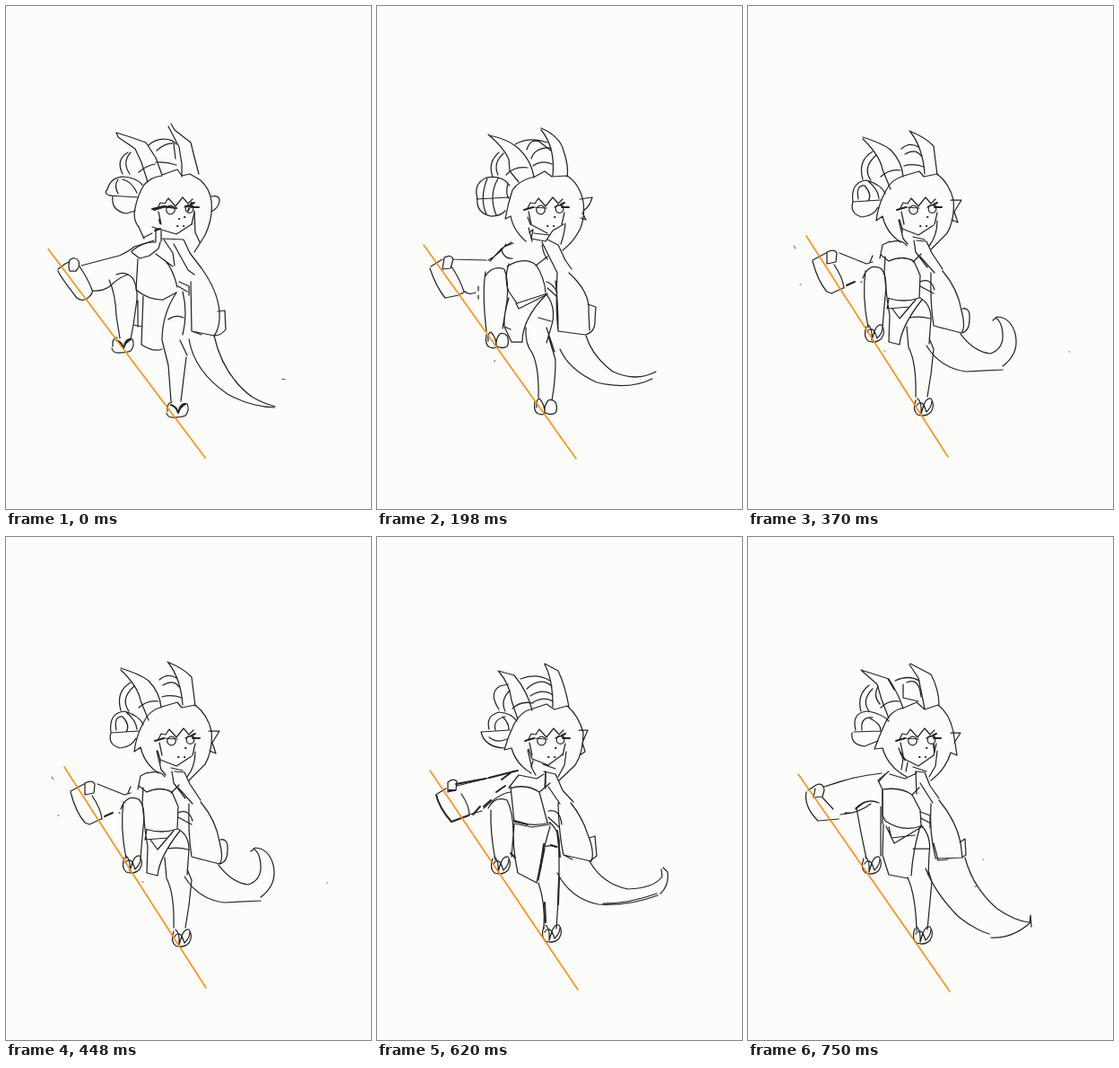
An HTML page for the animation above (0.87 s loop, 407 by 560 pixels).

```html
<!DOCTYPE html>
<html lang="en">
<head>
<meta charset="utf-8">
<title>Balancing on a pole</title>
<style>
html, body { margin: 0; width: 100%; height: 100%; overflow: hidden; background: #fcfcfa; }
svg { display: block; width: 407px; height: 560px; }
path, circle { fill: none; stroke: #252525; stroke-width: 1.25; stroke-linecap: round; stroke-linejoin: round; }
.bold { stroke-width: 2; }
.pole { stroke: #ff8c0a; stroke-width: 1.5; }
.pose { visibility: hidden; animation: short 870ms step-end infinite; animation-delay: calc(var(--at) * 1ms - 870ms); }
.long { animation-name: long; }
@keyframes short { 0% { visibility: visible; } 13.7931%, 100% { visibility: hidden; } }
@keyframes long { 0% { visibility: visible; } 14.9425%, 100% { visibility: hidden; } }
</style>
</head>
<body>
<svg viewBox="0 0 407 560">
<defs>
  <g id="face">
    <path d="M169 225L172 219 177 220 181 214 189 223 197 213 203 220 208 215"/>
    <path class="bold" d="M165 227L175 224M207 224L215 224M206 221L210 219"/>
    <path d="M175 224L190 225M199 224Q204 220 209 223M170 229L173 243M210 230L207 243"/>
    <circle cx="183.500" cy="227" r="4.800"/><circle cx="204.500" cy="226" r="4.300"/>
    <path class="bold" d="M191 245h.5M199 235h.5M198 245h.3"/>
  </g>
  <path id="wide" d="M-12-6Q-14 6-8 8Q-2 10 0 7Q6 10 11 7Q14 2 11-5Q7-9 3-7Q-2-1-1 7Q-1-3-7-9Q-11-8-10 1"/>
  <path id="round" d="M-9-7Q-13 4-7 9Q2 12 8 6Q13-2 8-9Q3-10 0-2L-3 8Q-2-5-7-9M-8-1Q-5-7 0-2L3 6Q9 0 9-6"/>
  <g id="strap">
    <path d="M-11 2Q-12-7-6-8M-12 4Q-11 9-5 9Q5 9 9 7Q14 1 11-6Q5-8 2-1"/>
    <path class="bold" d="M-7-5Q-1-3 1 4Q3-3 9-6"/>
  </g>
</defs>

<g class="pose" style="--at:0">
  <path d="M123 141L139 146 156 152 167 169 174 188M123 141L125 146 144 159 151 174 158 196M184 131L188 138 206 152 210 168 215 187M181 134L193 157 196 176 196 190"/>
  <path d="M130 187Q122 171 136 163M138 187Q129 174 139 163M159 155Q166 148 176 148Q186 148 190 154M168 161Q178 152 187 153L189 170M167 174Q178 173 190 177M148 185Q156 178 166 176"/>
  <path d="M118 211Q108 210 113 204Q117 190 131 190Q145 191 152 199M115 211L147 213M125 193Q120 200 125 209M119 212Q117 228 134 231L144 228M130 193Q140 195 146 208"/>
  <path d="M174 189Q162 190 154 199Q147 210 144 225Q141 238 148 246L154 259M174 188L191 182 196 189 205 187 217 194Q227 203 229 217Q231 236 222 255L210 274M229 212Q238 210 238 217Q237 225 229 229M153 258L163 253M210 228L211 252 216 263"/>
  <use href="#face"/>
  <path class="bold" d="M163 226L176 223 190 225M200 223L212 224M207 219L203 228M171 238L172 242M193 237h.3M166 250L172 248"/>
  <path d="M163 246L190 254 207 243M167 248V262M173 250V262"/>
  <path d="M84 289L126 278Q134 275 143 268L165 261M58 293L66 287 70 285M58 295Q61 302 79 325Q84 329 90 326Q98 320 96 316Q91 303 82 290M71 283Q77 278 81 284Q83 290 78 295L71 295Q69 289 71 283M96 317Q109 318 117 311Q126 302 136 299"/>
  <path d="M140 273Q153 262 167 263M140 274L149 281 160 278 170 270 172 263M167 276L186 290M147 282L145 316Q158 327 175 327L190 319M177 283Q186 292 191 313"/>
  <path d="M115 305Q122 320 123 345L127 370M123 299Q134 294 142 304Q147 315 146 327L142 355 139 371M153 323L151 377Q165 386 174 382M147 328V357M142 355L152 357M190 319Q174 343 174 372L181 400 184 440M197 318Q203 342 197 366M201 391L198 415 195 440M181 349Q189 343 198 347M193 307L204 312 204 322M192 312L202 318M194 372L202 389"/>
  <path d="M174 259L198 260 205 275 218 292Q236 317 238 340Q239 359 232 367L207 362 206 307M187 265L203 294 210 299M176 260L186 275 188 289M236 340L244 339 245 360Q240 367 232 367M207 362L218 366"/>
  <path d="M204 371Q210 407 247 432Q272 446 299 447M232 367Q242 411 274 435Q286 442 300 446"/>
  <path style="stroke-width:.8" d="M308 415.500h3"/>
  <use href="#strap" x="130" y="377"/><use href="#strap" x="191" y="449"/>
  <path class="pole" d="M47 270.500L222.500 503.500"/>
</g>

<g class="pose long" style="--at:120">
  <path d="M125 144Q145 148 156 157Q172 171 175 191M124 143Q142 158 147 171L148 184M149 185L158 196M183 136Q204 145 208 161Q214 178 212 190M183 138Q199 157 196 189"/>
  <path d="M129 190Q123 174 136 163M135 188Q129 175 141 164M154 154Q170 145 190 152M167 160Q171 147 181 151L194 161M172 170Q176 157 194 158M174 178Q184 171 195 176M144 188Q153 178 168 180"/>
  <path d="M112 214Q107 198 122 191Q140 188 148 200M112 214Q110 230 127 234Q138 234 143 228M111 215L147 213M123 192Q114 214 122 232M135 192Q124 211 133 233M146 197Q143 210 147 214"/>
  <path d="M176 190Q158 194 151 205Q146 220 143 237L149 234Q152 250 166 262M176 190L187 184 195 190 212 189Q226 198 230 218Q232 234 227 247Q220 262 207 272M226 215L240 213Q237 224 230 228M229 230L233 238 227 236M169 247L173 262M210 242Q209 254 205 265"/>
  <use href="#face" x="-1"/>
  <path d="M168 235L171 243 190 253M170 252L174 249 172 259 188 262 196 250 208 243M175 253L192 255"/>
  <path d="M84 282L122 283M126 284L139 270 150 263M139 272Q142 282 151 281M142 268L152 264M60 290L73 282M59 292Q66 313 76 325L91 322 98 318M83 290Q92 303 97 318M98 318Q102 322 110 319M75 280Q83 276 85 282L82 292 73 293 75 280M113 312v5M113 322v4M124 283Q137 276 144 265"/>
  <path d="M147 287Q141 304 147 318L156 331 190 320M145 290Q165 278 178 289Q187 304 188 319M177 289L190 279M155 331L158 337 190 321M184 266Q186 278 190 282"/>
  <path d="M121 296Q117 319 122 362M120 302Q128 288 142 293Q147 305 145 328L140 359M147 325Q141 344 142 357L150 374H162Q162 348 189 321M142 357L149 360M189 321Q201 337 194 358L189 375M180 347L194 351M166 358Q165 377 173 386Q181 403 180 436M191 367L199 394Q199 418 195 439M189 358L198 385M189 307Q196 309 201 319M190 314L200 323"/>
  <path d="M184 263L201 297Q199 337 202 362L232 366Q244 363 243 349L244 335 235 332M190 260L202 266 210 283 217 293M214 297Q238 319 236 340L237 361M202 362Q202 330 199 306"/>
  <path d="M204 382Q214 405 245 419Q281 428 307 415M233 367Q240 390 263 407Q289 419 311 407M131 395h.5"/>
  <use href="#wide" x="134" y="372"/><use href="#wide" x="188" y="446"/>
  <path class="pole" d="M52 266L222 504"/>
</g>

<g class="pose" style="--at:250">
  <path d="M128 147Q150 154 160 160Q172 175 174 191M128 147Q147 169 149 184L160 207M184 138Q200 150 206 155M184 140Q197 157 196 190M207 156L211 190"/>
  <path d="M126 193Q122 170 141 162M132 194Q128 177 144 167M157 157Q180 147 198 161M166 162Q178 152 187 159Q195 164 193 178M174 178Q179 160 188 158M170 180Q183 176 194 180M151 191Q160 181 171 183"/>
  <path d="M113 216Q113 197 130 192M122 215Q121 201 138 195L150 198M140 196Q150 203 153 211M113 217L148 216M113 218Q114 231 127 233L143 231"/>
  <path d="M174 190Q160 193 155 204Q147 217 143 236L151 234 158 249 172 263M174 191L191 185 196 190 211 190Q226 200 230 220Q231 239 223 252L206 270M224 216L240 215 230 229M231 229L234 240 226 243M166 228Q166 251 172 263M214 234L210 253 204 266"/>
  <use href="#face" x=".5" y="-1"/>
  <path class="bold" d="M168 237L169 243M173 240L173 244M190 243L194 243"/>
  <path d="M168 242L190 252 208 242M171 251L168 258M183 255L198 258M179 235L187 234"/>
  <path d="M95 279L137 283M64 291L84 279M67 291Q73 313 88 321L98 320 102 317M88 291Q98 307 99 321M85 274L93 272 94 288 85 290 85 274M103 315L111 319 120 313M136 282L151 266 161 261M140 284L154 264M136 282L146 286"/>
  <path d="M149 284L147 310 149 320Q171 329 188 321M149 284Q167 270 186 283L192 300 189 322M184 284L193 276M189 262Q191 277 200 288M150 323L156 340 164 346"/>
  <path d="M123 298Q122 327 127 354M122 298Q133 286 145 297Q147 322 142 354M148 322L150 354 148 370 157 369M157 369V374L173 370M174 370L174 353 182 330M153 328L162 344 178 327M190 323Q199 335 197 347L196 363M176 345Q187 340 198 346M174 350Q177 385 181 403L180 433M199 346Q195 371 199 391L198 431M188 308Q202 304 208 320M190 314L206 319"/>
  <path d="M186 258L197 259 201 273 215 292M205 299Q203 338 208 361L236 364Q243 358 242 345Q239 320 217 295M192 282L207 297M240 338L248 337 249 360 240 365M208 356Q209 333 204 303"/>
  <path d="M197 375Q211 404 240 414L262 417M265 413Q300 414 320 394Q331 380 322 373L317 372M240 365Q253 393 283 400Q313 400 316 373"/>
  <use href="#strap" x="136" y="363"/><use href="#strap" x="189" y="439"/>
  <path d="M179 445Q183 454 193 453Q199 451 200 444M133 372v5"/>
  <path class="pole" d="M58 261L223 503M216 515L219 520"/>
</g>

<g class="pose long" style="--at:370">
  <path d="M128 146Q150 153 159 160Q172 174 173 190M128 148Q147 166 150 182L159 204M180 139Q199 147 207 156L211 188M181 140Q195 158 197 187"/>
  <path d="M128 193Q122 172 139 162M137 194Q127 180 143 166M171 159Q180 151 190 157M175 165Q187 158 193 167M174 178Q184 175 196 179M148 190Q158 181 170 183"/>
  <path d="M117 218Q114 196 132 194Q149 199 153 209M123 215Q120 199 130 200Q139 210 134 217M117 218L148 216M117 218Q113 231 127 235Q140 234 145 224M134 195Q145 204 146 214"/>
  <path d="M174 189Q159 193 153 207Q145 222 143 239L150 234Q154 252 170 263M174 189L191 184 196 190 211 187Q225 198 229 216Q231 237 222 253L204 271M226 216L238 216 230 229M230 229L234 241 227 238M168 238L173 259 178 265M211 239Q211 256 202 267"/>
  <use href="#face" x="1"/>
  <path d="M169 238L172 248 190 255 207 244M172 247V252M184 257L197 260"/>
  <path d="M102 275L132 287 139 285M72 283L87 275M72 284Q78 307 88 318L93 320 106 314M96 288Q106 303 107 314M88 274Q96 270 99 275L98 285 88 287ZM136 285L139 278M147 281L150 266 158 262M126 307h1"/>
  <path class="bold" d="M110 311L119 307"/>
  <path d="M153 279L152 296 155 325Q174 331 191 325M148 277L157 284Q172 277 185 284L192 300 191 325M158 263Q172 259 177 267M184 285L193 276M185 261L187 274 200 291"/>
  <path d="M131 295Q127 323 134 358M128 303Q134 286 148 292Q156 300 153 323L150 357M155 326L158 345 157 374 169 377Q171 356 194 327M157 326L155 337 180 335M161 337L169 348 187 327M192 325Q204 332 204 348L202 376M180 347Q193 345 203 348M177 357L179 380Q188 397 187 435M202 370L207 382 204 410 200 435M192 307Q204 302 208 316M192 312L207 320"/>
  <path d="M188 261L199 262 205 275 217 293M204 297Q203 331 207 356L238 364Q243 358 238 339Q234 315 217 295M192 279L208 297M239 337Q248 335 247 349Q247 362 238 364M207 356L218 359"/>
  <path d="M199 378Q214 403 243 407L284 405M284 401Q303 387 298 365Q293 347 278 346L273 350M237 365Q252 385 270 387Q288 381 283 358Q281 350 276 347"/>
  <path style="stroke-width:.8" d="M51 267l2 3M58 310h1M358 385h.5M152 384h1"/>
  <use href="#round" x="141" y="364"/><use href="#round" x="196" y="446"/>
  <path class="pole" d="M65 256L223 502"/>
</g>

<g class="pose" style="--at:500">
  <path d="M135 148L153 154Q170 170 178 192M135 148L147 164 151 180 158 201M189 140L202 145Q210 165 215 190M189 141Q199 158 197 189M153 154L162 165"/>
  <path d="M136 192Q124 176 136 167L147 164M142 193Q135 178 149 171M161 158Q180 149 195 159M170 168Q183 156 196 166M173 174Q185 166 197 174M176 181Q186 176 197 181M151 190Q158 180 174 184"/>
  <path d="M124 215Q120 198 137 195Q150 195 157 204M131 214Q129 202 142 199M117 218L148 217M117 218Q121 233 139 237L145 226M123 223Q131 234 144 235M136 205Q145 205 148 215"/>
  <path d="M178 191Q162 193 155 205Q148 219 146 238Q151 251 170 265M178 191L190 186 198 190 214 190Q226 200 231 219L234 242 226 238Q221 258 203 272M227 213Q237 211 236 217Q235 224 229 229M169 228L174 248 183 258M215 233L208 255"/>
  <use href="#face" x=".5"/>
  <path class="bold" d="M174 253L182 257M173 242L169 235"/>
  <path d="M173 242L189 251 208 242M184 247V261M185 253L198 258"/>
  <path d="M96 278H138M73 282L85 275M95 282L103 304 105 315M138 278L145 267 158 262M137 289L145 283M106 313L117 309 124 301M110 309L114 306"/>
  <path class="bold" d="M71 285Q72 299 81 313L92 319 104 314M87 273L95 272 94 285 86 288 87 273M76 307L83 315M138 279L145 271M138 288L145 282"/>
  <path d="M147 278L152 288 152 319Q173 328 190 323M147 278Q160 260 178 267L186 263M153 282Q168 284 185 281L191 295 191 323M184 282L196 292M187 262L188 278"/>
  <path class="bold" d="M152 281L150 291M182 284L191 280M191 347H201"/>
  <path d="M127 302Q125 330 130 361M125 305Q130 289 143 292Q152 300 152 319L146 358M153 319L154 350 158 376 178 385M179 386L187 376 193 325M180 384L182 375M191 322Q204 331 204 344L201 378 206 389 203 437M192 322L202 333M181 384Q187 397 186 437M193 305Q205 302 210 315M193 311L203 322"/>
  <path d="M187 261L201 263 211 282 223 298M203 296L206 337 212 362 245 363 246 355Q241 321 220 297M192 279L209 298M236 340L242 334 246 354M209 356L204 320"/>
  <path d="M200 374Q215 402 248 408H276M279 404Q301 398 310 375L309 358 304 355 301 359M237 363Q251 386 278 386Q300 384 304 364L304 355"/>
  <use href="#wide" x="140" y="365"/><use href="#wide" x="194" y="444"/>
  <path class="pole" d="M62 256L225 504"/>
</g>

<g class="pose long" style="--at:620">
  <path d="M135 149L153 154Q168 172 173 193M136 150Q148 164 150 182L157 203M187 141L202 149Q210 166 214 189M187 142Q196 158 196 189"/>
  <path d="M136 192Q124 174 137 166L146 164M143 194Q137 182 148 171M160 158Q178 151 193 160M167 169Q182 155 195 166M171 177Q185 168 196 176M174 184Q187 177 196 183M151 191Q160 182 174 185"/>
  <path d="M125 214Q121 199 136 195Q150 196 156 205M132 215Q129 203 143 200M116 217L148 215M116 217Q120 234 142 235M125 223Q134 230 145 225M140 200Q147 207 147 214"/>
  <path d="M174 191Q160 194 153 208Q146 222 142 237L150 235Q155 253 172 263M174 191L189 186 198 192 212 188Q225 199 230 218Q230 240 221 254L203 271M225 215H235L229 229M229 229L232 239 226 243M168 237L173 258 177 265M211 239L209 254 202 267"/>
  <use href="#face"/>
  <path d="M169 236L173 247 191 254 207 242M174 249L172 256M185 253L199 258"/>
  <path d="M89 277L134 266M67 286L77 280M94 286Q103 299 103 310M147 279L158 265 178 269 186 264M103 309L117 305M119 302Q137 285 149 284M79 273Q85 268 89 272L88 282 79 284Z"/>
  <path class="bold" d="M66 287Q69 301 83 317L102 310M88 275L121 269M125 268L157 260M107 309L115 300M119 300L127 293M133 284L143 277M139 270L151 261M80 282L87 282"/>
  <path d="M149 278L153 317Q174 323 193 318M148 280Q166 274 181 284L190 318M181 284L193 274M188 261L187 278M153 319L173 323 193 320"/>
  <path d="M127 304Q126 329 132 360M124 302Q131 288 145 293Q152 306 152 331L150 356M153 320Q150 342 157 374L178 385M178 385L185 351 193 322M193 318Q205 329 203 346L203 378M180 382L187 347M187 345Q194 342 201 345M180 385Q188 408 186 436M203 374L202 405 200 436M191 305Q204 302 206 320M191 312L203 323"/>
  <path class="bold" d="M201 327L204 356M186 342L182 370M187 407L188 429M203 380L202 409M149 352L154 357M194 343L200 345M153 316L168 320"/>
  <path d="M186 261L199 264 207 282 219 295M202 296Q203 332 208 354L239 361Q243 351 235 331Q229 312 216 296M191 278L204 297M237 335L243 333 245 355 237 361M208 354L218 359M188 261V280"/>
  <path d="M201 374Q216 403 247 409Q281 411 313 399M252 408Q281 408 312 397M316 397Q326 388 324 373L319 368M237 361Q252 387 280 392Q309 391 318 378L317 370"/>
  <use href="#round" x="138" y="365"/><use href="#round" x="195" y="441"/>
  <path class="pole" d="M59 260L224 504"/>
</g>

<g class="pose" style="--at:750">
  <path d="M126 148L157 158Q168 175 173 191M127 149L144 164 149 181 157 202M181 141L204 153Q213 170 213 187M180 142L190 157 197 191M156 158L163 170"/>
  <path d="M126 194Q121 176 135 165M135 194Q126 182 139 169M164 160Q179 153 191 160M173 164L173 179 190 183M177 162Q191 156 193 178M148 190Q157 181 169 183M145 166Q139 177 147 186"/>
  <path d="M120 215Q115 195 134 194Q150 197 157 205M127 215Q125 200 139 201M118 217L148 216M116 218Q114 231 130 233L145 227M136 202Q148 207 148 216"/>
  <path d="M174 190Q159 193 153 207Q147 220 141 236L150 235Q156 256 177 267M174 190L188 184 197 192 212 187Q225 197 229 217L233 243 226 240Q221 258 204 271M226 218L237 218 230 229M168 235L173 247 171 259M211 238L209 255 202 267"/>
  <use href="#face"/>
  <path class="bold" d="M170 240L175 248M207 231L208 239"/>
  <path d="M172 246L190 255 207 243M178 251L176 261M184 256L199 261"/>
  <path d="M85 278Q114 267 149 263M85 278L118 268M65 284Q62 300 78 316L101 314M67 282L76 276Q84 273 85 282L83 289 73 290 75 280M83 290L95 303M103 309Q123 308 137 297M146 272L153 264M108 307h8M120 303L130 295"/>
  <path d="M145 271L150 281 150 310 153 316Q172 329 193 322M146 270L157 261M150 281Q171 278 183 287L192 304 193 321M183 287L191 279M187 261L188 286M158 264L175 269 188 263"/>
  <path d="M121 302L126 329 132 358M120 302Q133 290 146 296M148 300L148 355M150 282L150 319M151 320L150 354 157 376 178 380M154 322L163 341 195 322M157 323L160 335 186 332M182 377Q184 348 192 322M193 321Q205 333 202 353L201 376M184 347L202 347M178 379Q187 399 188 438M201 371L205 384 200 437M192 306L203 310 203 324M193 313L202 318"/>
  <path d="M187 261L197 262 203 277 213 291M204 297Q202 330 209 357M192 274L206 296M213 293Q232 316 237 340L239 357 209 358M236 340L242 336 243 354 238 357M207 341L212 360 223 359"/>
  <path d="M198 369Q209 397 235 423Q251 436 269 442M271 446Q295 447 314 430L315 421 316 434M242 357Q251 391 278 414Q297 427 313 429"/>
  <path style="stroke-width:.8" d="M253 389h2M262 359h.5"/>
  <use href="#round" x="138" y="365"/><use href="#round" x="195" y="443"/>
  <path class="pole" d="M56 264L225 506"/>
</g>
</svg>
</body>
</html>
```
